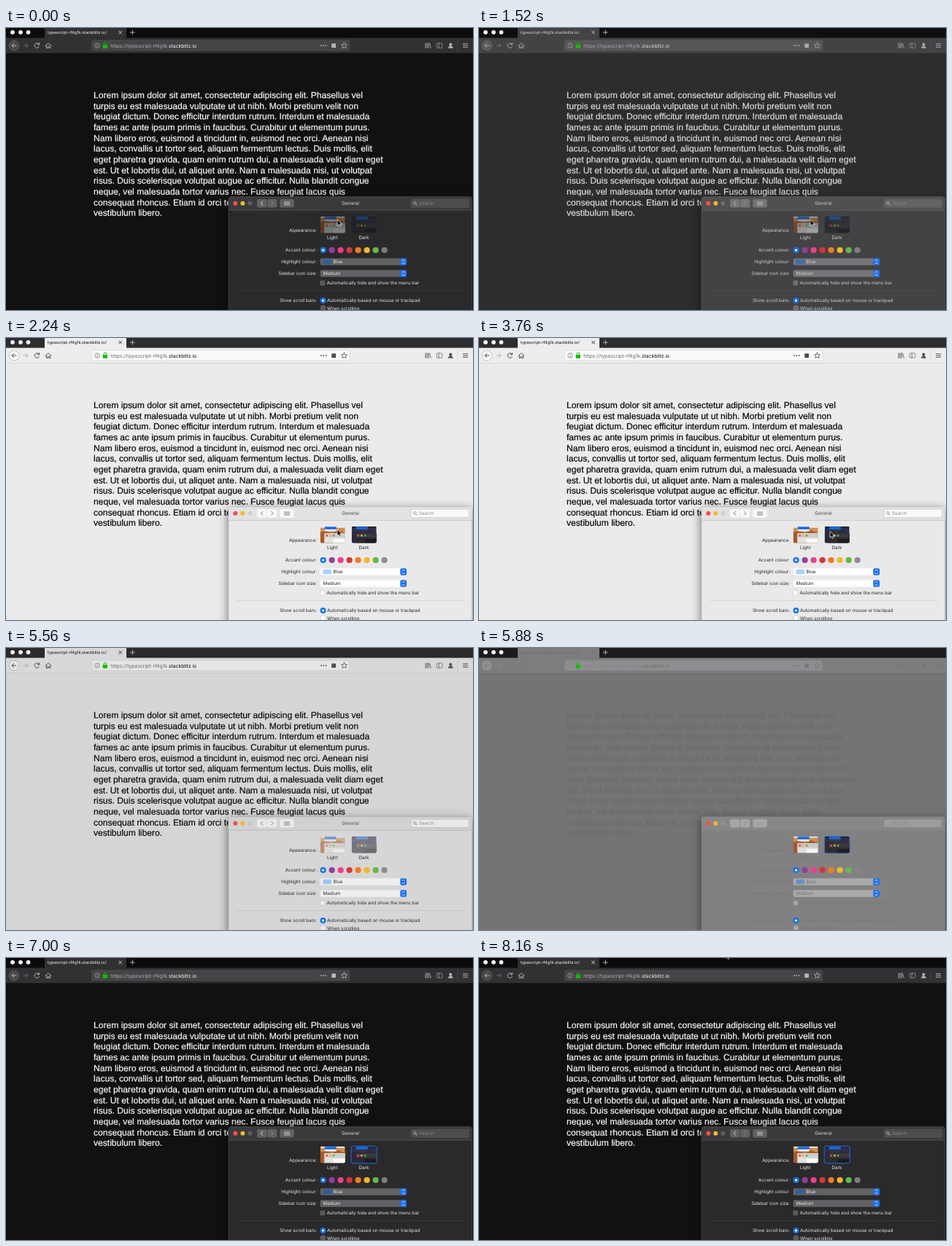
Recreate the animation shown at these times as an HTML page. Size 640x386 px, loop 8200 ms.

```html
<!DOCTYPE html>
<html lang="en">
<head>
<meta charset="utf-8">
<title>Appearance switch</title>
<style>
html, body { margin: 0; width: 100%; height: 100%; overflow: hidden; background: #111; }
svg { display: block; width: 100vw; height: 100vh; }
text { font-family: Inter, Roboto, sans-serif; white-space: pre; text-rendering: geometricPrecision; }
.page { font: 12.1px "Liberation Sans", Arial, sans-serif; fill: var(--ink); stroke: var(--ink); stroke-width: .2; }
</style>
</head>
<body>
<svg id="stage" viewBox="0 0 640 386" xmlns="http://www.w3.org/2000/svg"></svg>
<script>
const LOOP = 8200, STEP = 40;
const stage = document.getElementById('stage');

// Text and glyphs hold their colour longer and swap around the middle
const linear = p => p, late = p => p ** 1.15;
const swap = p => {
  const u = p ** 0.75;
  return u * u * (3 - 2 * u);
};

// name: [dark, light, mix curve]
const palette = {
  page: ['#111112', '#ebebeb'],
  ink: ['#f7f7f7', '#080808', swap],
  strip: ['#0b0b0c', '#2d2d31'],
  bar: ['#313134', '#ededee', late],
  barLine: ['#1b1b1d', '#d2d2d4'],
  field: ['#454548', '#fafafa', late],
  fieldLine: ['#4d4d50', '#c9c9cb', late],
  icon: ['#b5b5b8', '#4b4b4e', swap],
  faint: ['#69696c', '#b0b0b3'],
  url: ['#b0b0b4', '#68686b', swap],
  back: ['#48484b', '#fbfbfb', late],
  title: ['#3a3a3c', '#e2e2e2'],
  panel: ['#2a2a2c', '#e9e9e9'],
  well: ['#1c1c1e', '#e9e9e9', late],
  edge: ['#535355', '#bebebe'],
  label: ['#e6e6e6', '#262626', swap],
  titleInk: ['#dededf', '#4a4a4a', swap],
  button: ['#616163', '#f8f8f8'],
  glyph: ['#d5d5d6', '#747474', swap],
  search: ['#4d4d4f', '#fafafa'],
  hint: ['#88888a', '#8a8a8a'],
  popup: ['#626265', '#fdfdfd'],
  rule: ['#3e3e40', '#d0d0d0'],
  swatch: ['#315f98', '#acd0fa'],
  check: ['#5b5b5e', '#fefefe'],
  idle: ['#5e5e60', '#d0d0d0'],
  grey: ['#7d7d80', '#8e8e90']
};

const rgb = hex => [1, 3, 5].map(i => parseInt(hex.slice(i, i + 2), 16));
const paints = Object.entries(palette).map(([name, [a, b, curve = linear]]) => ({ name, a: rgb(a), b: rgb(b), curve }));
const paint = c => c in palette ? `var(--${c})` : c;
const rect = (x, y, w, h, fill, r = 0, line = 'none') =>
  `<rect x="${x}" y="${y}" width="${w}" height="${h}" rx="${r}" style="fill:${paint(fill)};stroke:${paint(line)};stroke-width:.6"/>`;
const dot = (x, y, r, fill, line = 'none') =>
  `<circle cx="${x}" cy="${y}" r="${r}" style="fill:${paint(fill)};stroke:${paint(line)};stroke-width:.7"/>`;
const path = (d, line, w = 1, fill = 'none') =>
  `<path d="${d}" style="fill:${paint(fill)};stroke:${paint(line)};stroke-width:${w};stroke-linecap:round;stroke-linejoin:round"/>`;
const text = (x, y, s, size, fill, anchor = 'start') =>
  `<text x="${x}" y="${y}" text-anchor="${anchor}" style="font-size:${size}px;fill:${paint(fill)}">${s}</text>`;

const story = [
  'Lorem ipsum dolor sit amet, consectetur adipiscing elit. Phasellus vel',
  'turpis eu est malesuada vulputate ut ut nibh. Morbi pretium velit non',
  'feugiat dictum. Donec efficitur interdum rutrum. Interdum et malesuada',
  'fames ac ante ipsum primis in faucibus. Curabitur ut elementum purus.',
  'Nam libero eros, euismod a tincidunt in, euismod nec orci. Aenean nisi',
  'lacus, convallis ut tortor sed, aliquam fermentum lectus. Duis mollis, elit',
  'eget pharetra gravida, quam enim rutrum dui, a malesuada velit diam eget',
  'est. Ut et lobortis dui, ut aliquet ante. Nam a malesuada nisi, ut volutpat',
  'risus. Duis scelerisque volutpat augue ac efficitur. Nulla blandit congue',
  'neque, vel malesuada tortor varius nec. Fusce feugiat lacus quis',
  'consequat rhoncus. Etiam id orci tempor, dapibus lacus in,',
  'vestibulum libero.'
];

function browser() {
  const lights = [9, 20, 30.5].map(x => dot(x, 5.8, 2.9, '#f4f4f4')).join('');
  const body = story.map((s, i) =>
    `<text class="page" x="120" y="${(96.2 + i * 14.64).toFixed(2)}">${s}</text>`).join('');
  return rect(0, 0, 640, 386, 'page') + rect(0, 0, 640, 14, 'strip') + lights +
    rect(53, 0, 112, 14, 'bar') +
    text(57, 8.2, 'typescript-rf4g1k.stackblitz.io/', 5.6, 'ink') +
    path('M154.6 4l4 4m0-4l-4 4', 'ink', 0.8) +
    path('M170.3 6h6m-3-3v6', '#d5d5d7', 0.8) +
    rect(0, 13.5, 640, 21, 'bar') + rect(0, 34, 640, 0.7, 'barLine') +
    dot(11, 24, 6.8, 'back', 'faint') +
    path('M14 24h-6m2.7-2.7l-2.7 2.7 2.7 2.7', 'icon') +
    path('M24 24h6m-2.7-2.7l2.7 2.7-2.7 2.7', 'faint') +
    path('M45.3 22.3a3.3 3.3 0 1 0 .1 3.2m.2-5v2.2h-2.2', 'icon') +
    path('M54 24.2l4-3.6 4 3.6m-6.7-.6v4h1.8v-2.3h1.8v2.3h1.8v-4', 'icon', 0.9) +
    rect(117.3, 16.8, 353.5, 14.3, 'field', 1.5, 'fieldLine') +
    dot(125, 24, 3.3, 'none', 'url') + path('M125 23.7v2m0-3.6v.1', 'url', 0.8) +
    rect(132.6, 23, 6.4, 4.7, '#12bc00', 0.7) + path('M134.1 23v-1.2a1.8 1.8 0 0 1 3.6 0v1.2', '#12bc00') +
    text(143.3, 26.5, 'https://typescript-rf4g1k.<tspan style="fill:var(--ink)">stackblitz.io</tspan>', 6.75, 'url') +
    [432, 435.3, 438.6].map(x => dot(x, 24, 0.9, 'icon')).join('') +
    rect(446.2, 21.2, 5.8, 5.8, 'icon', 0.5) +
    path('M463.5 20l1.2 2.6 2.9.3-2.2 1.9.7 2.8-2.6-1.5-2.6 1.5.7-2.8-2.2-1.9 2.9-.3z', 'icon', 0.8) +
    path('M575 20.8v6.5m2-6.5v6.5m2-6.5v6.5m1.3-6.3l2 6.2', 'icon', 0.9) +
    rect(590.3, 20.8, 7.5, 6.4, 'none', 0.8, 'icon') + path('M593.2 21v6', 'icon', 0.7) +
    dot(609.3, 22.6, 2, 'icon') + path('M606.2 27.2q.4-2.7 3.1-2.7t3.1 2.7z', 'icon', 0.5, 'icon') +
    path('M619 17v14', 'faint', 0.4) +
    path('M626.5 21.7h6.2m-6.2 2.3h6.2m-6.2 2.3h6.2', 'icon', 0.9) + body;
}

function thumb(id, x, c) {
  const beads = ['#ef4b45', '#f3b92f', '#47b944'];
  return rect(x, 258, 34, 22.5, 'well', 2) +
    `<g id="${id}" transform="translate(${x} 258)"><g clip-path="url(#card)">` +
    rect(0, 0, 34, 22.5, `url(#${id}Sky)`) +
    path('M0 8l7-2 9 3 8-4 10 4v14H0z', 'none', 0, c.hill) +
    rect(0, 0, 34, 1.7, c.menu) + rect(6, 0.3, 16, 3.6, '#1769e6') + rect(6, 3.9, 16, 2.7, c.sheet) +
    rect(5.5, 9.2, 30, 15, c.window, 1) + rect(5.5, 9.2, 30, 6, c.head, 1) +
    rect(18, 17, 16, 5.5, c.pane) +
    beads.map((b, i) => dot(9 + i * 4.7, 12.5, 1.4, b)).join('') + '</g></g>';
}

function popup(y, content) {
  return rect(430.7, y - 4.7, 118.3, 9.4, 'popup', 2) + rect(540.3, y - 4.7, 8.7, 9.4, '#1b70ee', 2) +
    path(`M543 ${y - 1.3}l1.7-1.7 1.7 1.7m0 2.6l-1.7 1.7-1.7-1.7`, '#fff', 0.8) + content;
}

function settings() {
  const row = (y, s) => text(426, y + 2.3, s, 6.3, 'label', 'end');
  const tints = ['#1474e8', '#953d9b', '#ee3f8c', '#dc333b', '#f17b20', '#f4b62c', '#62ba46', 'grey'];
  const tiles = [0, 1, 2, 3].map(c => [0, 1, 2].map(r => rect(381.4 + c * 2, 237.6 + r * 2, 1.3, 1.3, 'glyph')).join('')).join('');
  return `<g style="filter:drop-shadow(0 4px 7px #0008)">` + rect(305, 231, 333.5, 170, 'panel', 3, 'edge') + '</g>' +
    path('M305 249.5v-15.5q0-3 3-3h327.5q3 0 3 3v15.5z', 'none', 0, 'title') +
    path('M308 231.2h327.5', 'edge', 0.5) + rect(305, 249, 333.5, 0.7, 'edge') +
    dot(314.3, 240, 3, '#f6504a') + dot(324.3, 240, 3, '#f2b92e') + dot(334.3, 240, 3, 'idle') +
    rect(344, 234.3, 13.3, 11.4, 'button', 2) + rect(358, 234.3, 13.3, 11.4, 'button', 2) +
    path('M351.8 237.4l-2.5 2.6 2.5 2.6', 'glyph') + path('M363.6 237.4l2.5 2.6-2.5 2.6', 'hint') +
    rect(375.3, 234.3, 19.4, 11.4, 'button', 2) + tiles +
    text(472, 242.3, 'General', 6.4, 'titleInk', 'middle') +
    rect(555, 234.3, 79.5, 11.4, 'search', 2, 'edge') +
    dot(560.3, 239.5, 1.8, 'none', 'glyph') + path('M561.7 241l1.6 1.6', 'glyph', 0.8) +
    text(566, 242.4, 'Search', 6.2, 'hint') +
    row(276.5, 'Appearance:') +
    thumb('light', 430.7, { hill: '#a65a28', menu: '#f4eee9', sheet: '#ececec', window: '#e2e2e2', head: '#cfccca', pane: '#fafafa' }) +
    thumb('dark', 473.7, { hill: '#29283f', menu: '#242329', sheet: '#37363c', window: '#2b2a31', head: '#39383f', pane: '#1c1c21' }) +
    `<rect id="ring" x="473.2" y="257.6" width="35" height="23.4" rx="2.5" style="fill:none;stroke:#236fd0;stroke-width:1"/>` +
    text(447.3, 289.1, 'Light', 6.3, 'label', 'middle') + text(490.5, 289.1, 'Dark', 6.3, 'label', 'middle') +
    row(304, 'Accent colour:') +
    tints.map((c, i) => dot(434.6 + i * 12, 304, 4.1, c)).join('') + dot(434.6, 304, 1.5, '#fff') +
    row(320, 'Highlight colour:') + popup(320, rect(434.5, 316.8, 11.5, 6.4, 'swatch') + text(448.5, 322.3, 'Blue', 6.3, 'label')) +
    row(336, 'Sidebar icon size:') + popup(336, text(434.5, 338.3, 'Medium', 6.3, 'label')) +
    rect(430.6, 345.8, 6.4, 6.4, 'check', 1.3, 'edge') +
    text(439.5, 351.3, 'Automatically hide and show the menu bar', 6.3, 'label') +
    rect(316, 359, 313, 0.7, 'rule') +
    row(373, 'Show scroll bars:') +
    dot(434.5, 373, 4, '#1474e8') + dot(434.5, 373, 1.5, '#fff') +
    text(440, 375.3, 'Automatically based on mouse or trackpad', 6.3, 'label') +
    dot(434.5, 383.3, 3.8, 'check', 'edge') + text(440, 385.6, 'When scrolling', 6.3, 'label');
}

const sky = (id, a, b) => `<linearGradient id="${id}" x2="0" y2="1"><stop stop-color="${a}"/><stop offset="1" stop-color="${b}"/></linearGradient>`;
stage.innerHTML = '<defs>' + sky('lightSky', '#d29a5e', '#c46a25') + sky('darkSky', '#25294a', '#4a4259') +
  '<clipPath id="card"><rect width="34" height="22.5" rx="2"/></clipPath></defs>' +
  browser() + settings() +
  '<g id="cursor">' + path('M0 0v8.2l1.9-1.7 1.4 3 1.5-.7-1.4-2.9h2.7z', '#fff', 0.7, '#050505') + '</g>';

const [light, dark, ring, cursor] = ['light', 'dark', 'ring', 'cursor'].map(id => document.getElementById(id));

// Piecewise linear value through [time, value] points
function track(points, t) {
  const i = points.findIndex(p => p[0] > t);
  if (i < 0) return points[points.length - 1][1];
  if (i === 0) return points[0][1];
  const [t0, a] = points[i - 1], [t1, b] = points[i];
  return a + (b - a) * (t - t0) / (t1 - t0);
}
const smooth = (t, a, b) => {
  const u = Math.min(1, Math.max(0, (t - a) / (b - a)));
  return u * u * (3 - 2 * u);
};

const fade = [[960, 0], [1280, 0.05], [1520, 0.13], [1680, 0.28], [1839, 0.28], [1840, 0.63], [2040, 0.87], [2240, 1],
  [5440, 1], [5560, 0.9], [5719, 0.9], [5720, 0.68], [5920, 0.4], [6160, 0.14], [6440, 0.015], [6680, 0]];
const enabled = [[1000, 0.45], [1520, 0.55], [1680, 0.7], [1839, 0.7], [1840, 1],
  [4120, 1], [4320, 0.5], [5560, 0.55], [5719, 0.55], [5720, 0.8], [5920, 1]];

function pointer(t) {
  if (t >= 8120) return [338, -8];
  if (t >= 4800) return [700, 400];
  const over = smooth(t, 2440, 3280), out = smooth(t, 4440, 4800);
  return [454 + 27 * over + 165 * out, 262.5 + 2.5 * over + 125 * out];
}

function render(ms) {
  const t = Math.floor(ms % LOOP / STEP) * STEP;
  const p = track(fade, t), on = track(enabled, t);
  for (const { name, a, b, curve } of paints) {
    const k = curve(p);
    stage.style.setProperty('--' + name, `rgb(${a.map((v, i) => Math.round(v + (b[i] - v) * k))})`);
  }
  light.style.opacity = on;
  dark.style.opacity = on;
  ring.style.opacity = smooth(t, 5680, 6080);
  cursor.setAttribute('transform', `translate(${pointer(t)})`);
}

const start = performance.now();
(function tick() {
  render(performance.now() - start);
  requestAnimationFrame(tick);
})();
</script>
</body>
</html>
```
